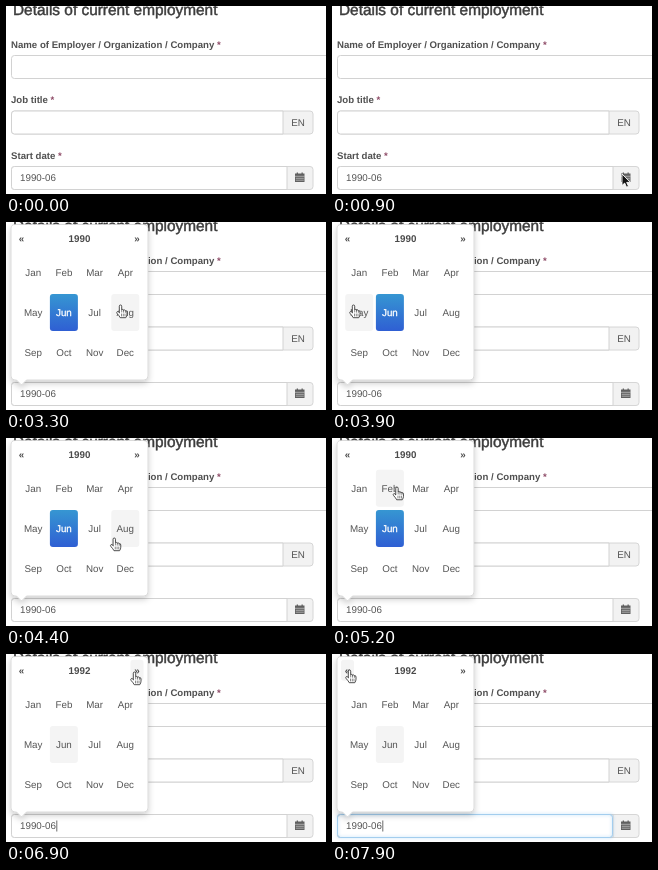
Recreate the animation shown at these times as an HTML page. Size 320 px wide and 188 px high, loop 8 s.

```html
<!DOCTYPE html>
<html lang="en">
<head>
<meta charset="utf-8">
<title>Month picker</title>
<style>
html, body { margin: 0; width: 100%; height: 100%; overflow: hidden; background: #fff; }
svg { display: block; width: 320px; height: 188px; font: 9.8px "Liberation Sans", Arial, sans-serif; fill: #555; text-rendering: geometricPrecision; }
.title { font-size: 15.4px; fill: #3c3c3c; stroke: #3c3c3c; stroke-width: .45; }
.label { font-size: 9.65px; font-weight: bold; fill: #505050; }
.label tspan { fill: #8d4a66; }
.box { fill: #fff; stroke: #d2d2d2; }
.addon { fill: #f2f2f2; stroke: #d6d6d6; }
.mid { text-anchor: middle; }
.bold { font-weight: bold; fill: #4a4a4a; }
</style>
</head>
<body>
<svg viewBox="0 0 320 188">
  <defs>
    <linearGradient id="blue" x2="0" y2="1">
      <stop stop-color="#3696d2"/><stop offset="1" stop-color="#2f5fd3"/>
    </linearGradient>
    <filter id="shadow" x="-20%" y="-20%" width="140%" height="140%">
      <feDropShadow dx="0" dy="3" stdDeviation="3" flood-opacity=".2"/>
    </filter>
    <filter id="blur" x="-5%" y="-40%" width="110%" height="180%"><feGaussianBlur stdDeviation="1.5"/></filter>
  </defs>

  <text class="title" x="7" y="9">Details of current employment</text>
  <text class="label" x="5" y="42">Name of Employer / Organization / Company <tspan>*</tspan></text>
  <rect class="box" x="5.5" y="49.5" width="330" height="23" rx="3"/>

  <text class="label" x="5" y="97">Job title <tspan>*</tspan></text>
  <rect class="addon" x="5.5" y="105" width="301.500" height="23" rx="3"/>
  <path class="box" d="M277 105H8.500a3 3 0 0 0-3 3v17a3 3 0 0 0 3 3H277z"/>
  <text class="mid" x="292" y="119.800">EN</text>

  <text class="label" x="5" y="152.500">Start date <tspan>*</tspan></text>
  <rect id="button" class="addon" x="5.5" y="160.500" width="301.500" height="23" rx="3"/>
  <path class="box" d="M281 160.500H8.500a3 3 0 0 0-3 3v17a3 3 0 0 0 3 3H281z"/>
  <g id="focus" fill="none">
    <rect x="5.500" y="160.500" width="275" height="23" rx="3" stroke="#66afe9" stroke-width="2" opacity=".3" filter="url(#blur)"/>
    <rect x="5.500" y="160.500" width="275" height="23" rx="3" stroke="#a3cdee"/>
  </g>
  <text x="14" y="175.200">1990-06</text>
  <path id="caret" d="M50.800 166.500v11" stroke="#444" stroke-width=".8"/>
  <g fill="#606060">
    <path d="M289 167.500h9.500v8.500h-9.500zM290.700 166.500h1.300v2h-1.300zM295.500 166.500h1.300v2h-1.300z"/>
    <path d="M289 170.300h9.500M289.800 172.300h8M289.800 174.200h8" stroke="#f2f2f2" stroke-width=".5"/>
  </g>

  <g id="popup">
    <path d="M9 2.500H138a4 4 0 0 1 4 4V154a4 4 0 0 1-4 4H20.500l-5 5-5-5H9a4 4 0 0 1-4-4V6.500a4 4 0 0 1 4-4z" fill="#fff" stroke="#ccc" stroke-width=".7" filter="url(#shadow)"/>
    <text class="mid bold" id="year" x="73.500" y="19.500"></text>
  </g>

  <circle id="ring" r="18" fill="none" stroke="#555" stroke-opacity=".4"/>
  <path id="arrow" d="M0 0V11.500L2.700 9.100 4.500 13.200 6.500 12.300 4.700 8.400H8.300z" fill="#111" stroke="#fff" stroke-width=".9"/>
  <g id="hand" stroke="#3a3a3a" stroke-width=".9" stroke-linejoin="round" stroke-linecap="round">
    <path fill="#fff" d="M-1.200 7.500V1.200Q-1.200 0 0 0T1.200 1.200V4.600Q2.300 4 3 5.100 4.200 4.500 4.900 5.700 6.500 5.300 6.500 7V9.200Q6.500 10.800 5.300 12.700H-.3Q-1.200 10.800-3.300 8.600-4.300 7-3.100 6.500-2.200 6.300-1.200 7.500z"/>
    <path fill="none" stroke-width=".6" d="M1.200 4.600V7M3 5.100V7.200M4.900 5.700V7.400M1 9v2M2.800 9v2M4.500 9v2"/>
  </g>
</svg>
<script>
const LOOP = 8000, STEP = 100;
const $ = id => document.getElementById(id);
const show = (el, on) => { el.style.display = on ? '' : 'none'; };
const set = (el, attrs) => Object.entries(attrs).forEach(([k, v]) => el.setAttribute(k, v));
const progress = (t, from, to) => Math.max(0, Math.min(1, (t - from) / (to - from)));
const mix = (a, b, p) => a + (b - a) * p;

// Each press takes effect at its second time
const opening = { down: 1600, done: 2000 };
const yearClicks = [{ down: 5900, done: 6200 }, { down: 6700, done: 6900 }];
const clicks = [opening, ...yearClicks];

// Straight pointer moves, each starting where the previous one ended
const moves = [
  { from: 100, to: 700, x: 303, y: 172 },
  { from: 800, to: 900, x: 290, y: 168 },
  { from: 2800, to: 3100, x: 115, y: 83 },
  { from: 5300, to: 5500, x: 128.5, y: 18 },
  { from: 7000, to: 7900, x: 17.5, y: 16 }
];

// Circles the months one way, then back the other way
function browse(t) {
  const turn = 330 * progress(t, 3300, 4400) - 270 * progress(t, 4500, 5300);
  const angle = -turn * Math.PI / 180;
  return { x: 68 + 46.5 * Math.cos(angle), y: 83 + 34 * Math.sin(angle) };
}

function pointer(t) {
  let at = { x: 12, y: 10 };
  for (const m of moves) {
    if (t < m.from) break;
    if (m.from >= 5300) at = m.from === 5300 ? browse(m.from) : at;
    const p = progress(t, m.from, m.to);
    at = { x: mix(at.x, m.x, p), y: mix(at.y, m.y, p) };
  }
  return t >= 3300 && t < 5300 ? browse(t) : at;
}

function addCell(label, x, y, w, h, bold) {
  $('popup').insertAdjacentHTML('beforeend',
    `<rect x="${x - w / 2}" y="${y - h / 2}" width="${w}" height="${h}" rx="3"/>` +
    `<text class="mid ${bold ? 'bold' : ''}" x="${x}" y="${y + 3.5}" stroke-width=".3">${label}</text>`);
  const text = $('popup').lastChild, rect = text.previousSibling;
  const hit = p => Math.abs(p.x + 1.5 - x) < w / 2 && Math.abs(p.y - y) < h / 2;
  return { rect, text, hit, chosen: label === 'Jun' };
}

const cells = 'Jan Feb Mar Apr May Jun Jul Aug Sep Oct Nov Dec'.split(' ').map((name, i) =>
  addCell(name, 27.2 + (i % 4) * 30.7, 50.3 + Math.floor(i / 4) * 40.3, 28, 37));
cells.push(addCell('«', 15.5, 16.2, 13, 21, true), addCell('»', 131, 16.2, 13, 21, true));

function draw(time) {
  const t = Math.floor(time / STEP) * STEP;
  const p = pointer(t);
  const open = t >= opening.done;
  const inside = open && p.x < 142 && p.y < 158;
  const clicked = yearClicks.filter(c => t >= c.done);

  show($('popup'), open);
  $('year').textContent = 1990 + (clicked.length && clicked.length);
  for (const c of cells) {
    const active = c.chosen && !clicked.length;
    const lit = c.chosen || (inside && c.hit(p));
    set(c.rect, { fill: active ? 'url(#blue)' : lit ? '#f4f4f4' : 'none' });
    c.text.style.fill = active ? '#fff' : '';
    set(c.text, { stroke: active ? '#fff' : 'none' });
  }

  // Pressing takes the focus away; it fades in again afterwards
  const pressed = clicks.some(c => t >= c.down && t < c.done);
  const focused = clicked.length > 0 && !pressed;
  const age = focused ? t - clicked[clicked.length - 1].done : 0;
  $('focus').style.opacity = progress(age, 0, 200);
  show($('caret'), focused && age % 1000 < 500);
  $('button').style.fill = pressed && !open ? '#e8e8e8' : '';

  show($('ring'), clicks.some(c => t >= c.down && t < c.down + 200));
  show($('arrow'), t >= 100 && !inside);
  show($('hand'), inside);
  for (const id of ['ring', 'arrow', 'hand']) set($(id), { transform: `translate(${p.x} ${p.y})` });
}

const begin = performance.now();
function tick() {
  draw((performance.now() - begin) % LOOP);
  requestAnimationFrame(tick);
}
tick();
</script>
</body>
</html>
```
